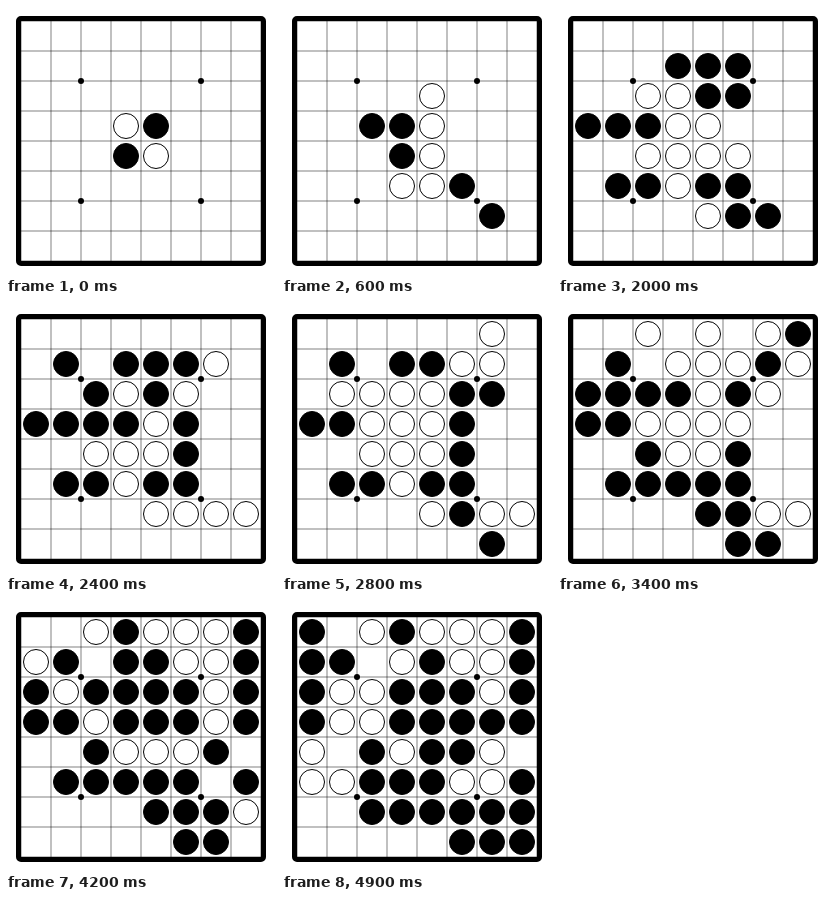
Write an HTML page with a canvas that moves like this. It is 270 px wide and 270 px high and loops after 5000 ms.

```html
<!DOCTYPE html>
<html lang="en">
<head>
<meta charset="utf-8">
<title>Disc game</title>
<style>
  html, body { margin: 0; width: 100%; height: 100%; overflow: hidden; background: #fff; }
  canvas { display: block; width: 270px; height: 270px; }
</style>
</head>
<body>
<canvas id="board"></canvas>
<script>
const SIZE = 270, CELL = 30, EDGE = 15, STEP = 100;
const BLACK = 1, WHITE = -1;
const MOVES =
  "e6f6c4d6g7e3f2c6f7e2f3c3c5e7b6b4d2d3a4f5f4g2b2h7g3" +
  "b3g8g1a3e1f8h2h1c1g4h3d1f1h4g5h6a2h8g6a1a6c7a5d7";
const DIRS = [[1, 0], [1, 1], [0, 1], [-1, 1], [-1, 0], [-1, -1], [0, -1], [1, -1]];

const canvas = document.getElementById("board");
const ctx = canvas.getContext("2d");
const scale = window.devicePixelRatio || 1;
canvas.width = canvas.height = Math.round(SIZE * scale);
ctx.scale(scale, scale);

const inside = (x, y) => x >= 0 && x < 8 && y >= 0 && y < 8;

// Returns a new board with the disc placed and all enclosed discs turned.
function play(board, x, y, side) {
  const next = board.slice();
  next[y * 8 + x] = side;
  for (const [dx, dy] of DIRS) {
    const run = [];
    let cx = x + dx, cy = y + dy;
    while (inside(cx, cy) && board[cy * 8 + cx] === -side) {
      run.push(cy * 8 + cx);
      cx += dx;
      cy += dy;
    }
    if (inside(cx, cy) && board[cy * 8 + cx] === side) {
      for (const i of run) next[i] = side;
    }
  }
  return next;
}

function buildGame() {
  const start = new Array(64).fill(0);
  start[27] = start[36] = WHITE;
  start[28] = start[35] = BLACK;
  const boards = [start];
  let side = BLACK;
  for (let i = 0; i < MOVES.length; i += 2) {
    const x = MOVES.charCodeAt(i) - 97;
    const y = MOVES[i + 1] - 1;
    boards.push(play(boards[boards.length - 1], x, y, side));
    side = -side;
  }
  return boards;
}

function circle(x, y, r) {
  ctx.beginPath();
  ctx.arc(x, y, r, 0, Math.PI * 2);
}

function drawBoard() {
  const span = CELL * 8;
  ctx.fillStyle = "#fff";
  ctx.fillRect(0, 0, SIZE, SIZE);
  ctx.strokeStyle = "#000";
  ctx.lineJoin = "round";
  ctx.lineWidth = 10;
  ctx.strokeRect(EDGE, EDGE, span, span);
  ctx.fillRect(EDGE, EDGE, span, span);

  ctx.lineWidth = 0.5;
  ctx.beginPath();
  for (let i = 0; i <= 8; i++) {
    const p = EDGE + i * CELL;
    ctx.moveTo(p, EDGE);
    ctx.lineTo(p, EDGE + span);
    ctx.moveTo(EDGE, p);
    ctx.lineTo(EDGE + span, p);
  }
  ctx.stroke();

  ctx.fillStyle = "#000";
  for (const x of [75, 195]) {
    for (const y of [75, 195]) {
      circle(x, y, 3);
      ctx.fill();
    }
  }
}

function drawDiscs(board) {
  ctx.lineWidth = 1;
  board.forEach((side, i) => {
    if (!side) return;
    circle(30 + (i % 8) * CELL, 30 + (i >> 3) * CELL, 12.5);
    ctx.fillStyle = side === BLACK ? "#000" : "#fff";
    ctx.fill();
    ctx.stroke();
  });
}

const boards = buildGame();
const begin = performance.now();
let shown = -1;

function tick() {
  const step = Math.floor((performance.now() - begin) / STEP) % boards.length;
  if (step !== shown) {
    shown = step;
    drawBoard();
    drawDiscs(boards[step]);
  }
  requestAnimationFrame(tick);
}
tick();
</script>
</body>
</html>
```
